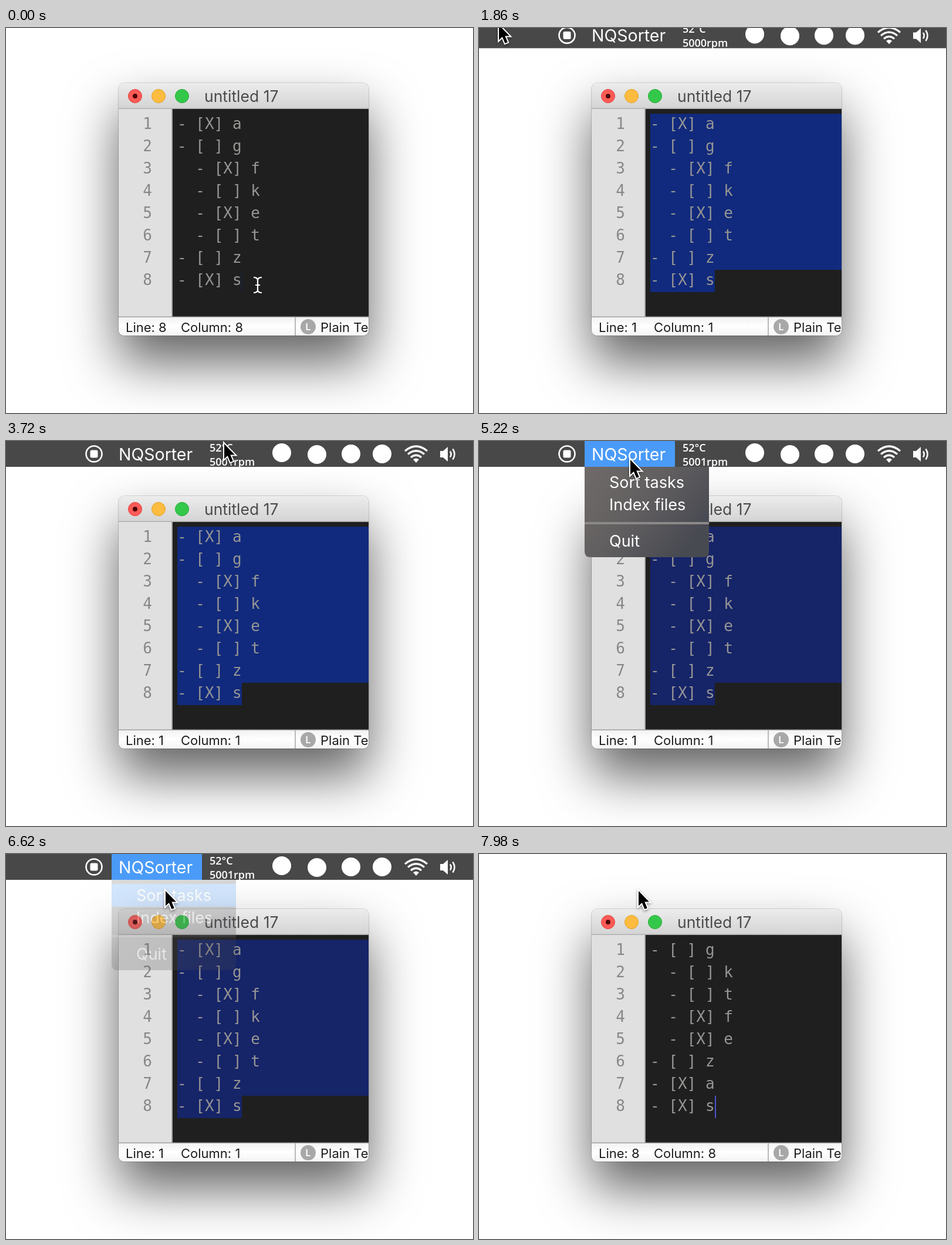
These frames come from a looping animation (796 by 656 pixels, 8 s). An HTML page:

```html
<!DOCTYPE html>
<html lang="en">
<head>
<meta charset="utf-8">
<title>Sorting a task list</title>
<style>
  html, body { margin: 0; width: 100%; height: 100%; overflow: hidden; background: #fff; }
  #shadow {
    position: absolute; left: 192px; top: 94px; width: 426px; height: 430px; border-radius: 10px;
    box-shadow: 0 0 0 1px rgba(0,0,0,.16), 0 46px 88px rgba(0,0,0,.62);
  }
  svg { position: absolute; left: 0; top: 0; width: 796px; height: 656px; overflow: hidden; }
  text { font-family: Inter, sans-serif; white-space: pre; }
  .code text { font: 26px "DejaVu Sans Mono", monospace; fill: #969694; }
  .code .num { fill: #878787; text-anchor: end; }
  .status { font-size: 22px; fill: #1c1c1c; }
  .bar text, .menu text { font-size: 27px; fill: #fff; }
  .bar .stat { font: 600 18px "Open Sans", sans-serif; }
  .line { fill: none; stroke: #fff; }
  #arrow { filter: drop-shadow(0 2px 2px rgba(0,0,0,.4)); }
</style>
</head>
<body>
<div id="shadow"></div>
<svg viewBox="0 0 796 656">
  <defs>
    <clipPath id="frame"><rect x="192" y="94" width="426" height="430" rx="9"/></clipPath>
    <linearGradient id="title" x2="0" y2="1"><stop stop-color="#ececec"/><stop offset="1" stop-color="#d3d3d3"/></linearGradient>
    <linearGradient id="foot" x2="0" y2="1"><stop stop-color="#f1f1f1"/><stop offset=".5" stop-color="#fff"/><stop offset="1" stop-color="#f4f4f4"/></linearGradient>
    <linearGradient id="glass" x2="1" y2=".6"><stop stop-color="#706b69"/><stop offset=".5" stop-color="#625f60"/><stop offset="1" stop-color="#484a52"/></linearGradient>
  </defs>

  <g clip-path="url(#frame)">
    <rect x="192" y="94" width="426" height="44" fill="url(#title)"/>
    <rect x="192" y="94" width="426" height="1" fill="#f6f6f6"/>
    <rect x="192" y="136.500" width="426" height="1.500" fill="#b0b0b0"/>
    <circle cx="220" cy="116" r="11.500" fill="#fc5b57" stroke="#e2443f"/>
    <circle cx="220" cy="116" r="4" fill="#4d0000"/>
    <circle cx="260" cy="116" r="11.500" fill="#fdbc40" stroke="#dfa023"/>
    <circle cx="300" cy="116" r="11.500" fill="#34c84a" stroke="#27aa35"/>
    <text x="338" y="126" font-size="26.500" fill="#4b4b4b">untitled 17</text>

    <rect x="192" y="138" width="92" height="354" fill="#e0e0e0"/>
    <rect x="282" y="138" width="2" height="354" fill="#a6a6a6"/>
    <rect x="284" y="138" width="334" height="354" fill="#1f1f1f"/>
    <path id="sel"/>
    <g class="code" id="code"></g>
    <rect id="caret" x="402" y="412" width="2" height="38" fill="#4b55cf"/>

    <rect x="192" y="492" width="426" height="32" fill="url(#foot)"/>
    <rect x="192" y="491.500" width="426" height="1.500" fill="#a2a2a2"/>
    <text class="status" id="row" x="204" y="518"></text>
    <text class="status" id="col" x="298" y="518"></text>
    <rect x="492" y="493" width="2" height="31" fill="#b9b9b9"/>
    <circle cx="515" cy="509" r="13" fill="#a8a8a8"/>
    <text x="515" y="515" font-size="16" font-weight="600" fill="#fff" text-anchor="middle">L</text>
    <text class="status" x="536" y="518">Plain Text</text>
  </g>

  <g class="menu" id="menu">
    <path d="M180 44H392V188Q392 198 382 198H190Q180 198 180 188Z" fill="url(#glass)"/>
    <rect id="pick" x="180" y="51" width="212" height="39" fill="#4a9bf8"/>
    <rect x="180" y="138" width="212" height="4" fill="#8b8888"/>
    <text x="222" y="80">Sort tasks</text>
    <text x="222" y="118">Index files</text>
    <text x="222" y="180">Quit</text>
  </g>

  <g class="bar" id="bar">
    <rect width="796" height="44" fill="#484848"/>
    <rect id="lit" x="180" width="154" height="44" fill="#4a9bf8"/>
    <circle class="line" cx="150" cy="22" r="13.500" stroke-width="2.600"/>
    <rect x="143.500" y="15.500" width="13" height="13" rx="2.500" fill="#fff"/>
    <text x="192" y="33" style="font-size:28.500px">NQSorter</text>
    <text class="stat" x="347" y="18">52°C</text>
    <text class="stat" id="rpm" x="347" y="42"></text>
    <g fill="#fff">
      <circle cx="470" cy="20" r="16"/><circle cx="530" cy="23" r="16"/>
      <circle cx="588" cy="22" r="16"/><circle cx="641" cy="22" r="16"/>
      <path d="M699 37l-5-5.500q5-4 10 0z"/>
      <path d="M740 17h5l8-7v25l-8-7h-5z"/>
    </g>
    <path class="line" stroke-width="3.200" d="M680 17Q699 1 718 17M685 22.500Q699 11 713 22.500M690 28Q699 20.500 708 28"/>
    <path class="line" stroke-width="2.600" d="M757 17.500q3.500 5 0 10M761.500 13.500q6 9 0 18"/>
  </g>

  <path id="beam" class="line" stroke-width="2.200" d="M-7-13Q0-13 0-8V8Q0 13-7 13M7-13Q0-13 0-8M0 8Q0 13 7 13M-4 0H4"/>
  <path id="arrow" d="M0 0V25.500L5.800 20L10.400 31L14.800 29.200L10.300 18.400H18Z" stroke="#fff" stroke-width="4" paint-order="stroke"/>
</svg>
<script>
const LOOP = 8000, ROW = 38, TOP = 146, LEFT = 292, CHAR = 15.65;
const before = ["- [X] a", "- [ ] g", "  - [X] f", "  - [ ] k", "  - [X] e", "  - [ ] t", "- [ ] z", "- [X] s"];
const after = ["- [ ] g", "  - [ ] k", "  - [ ] t", "  - [X] f", "  - [X] e", "- [ ] z", "- [X] a", "- [X] s"];

// time, x, y of the pointer
const path = [
  [20, 429, 438], [780, 177, 121], [840, 177, 121], [920, 174, 119], [1200, 174, 119],
  [1760, 34, -5], [2020, 34, -5], [2820, 152, 4], [2880, 152, 4], [3680, 370, 6],
  [3720, 372, 5], [4220, 372, 5], [4820, 258, 32], [5240, 258, 32], [5740, 272, 63]
];
const OPEN = 4900, CLOSED = 6670, SORTED = 7500;

const $ = id => document.getElementById(id);
const clamp = (v, lo = 0, hi = 1) => Math.min(hi, Math.max(lo, v));
const span = (t, a, b) => clamp((t - a) / (b - a));
const smooth = p => p * p * (3 - 2 * p);
const show = (id, on) => $(id).setAttribute("visibility", on ? "visible" : "hidden");
const move = (id, x, y) => $(id).setAttribute("transform", `translate(${x} ${y})`);

function addText(x, y, cls) {
  const el = document.createElementNS("http://www.w3.org/2000/svg", "text");
  el.setAttribute("x", x);
  el.setAttribute("y", y);
  el.setAttribute("class", cls);
  return $("code").appendChild(el);
}
const rows = before.map((_, i) => {
  const y = 172 + i * ROW;
  addText(249, y, "num").textContent = i + 1;
  return addText(LEFT, y, "");
});

function pointer(t) {
  const i = path.findIndex(k => k[0] > t);
  if (i < 0) return path[path.length - 1].slice(1);
  if (!i) return path[0].slice(1);
  const [a, x0, y0] = path[i - 1], [b, x1, y1] = path[i];
  const p = smooth(span(t, a, b));
  return [x0 + (x1 - x0) * p, y0 + (y1 - y0) * p];
}

function selection(row, col) {
  const x = LEFT + col * CHAR, y = TOP + row * ROW, last = TOP + 7 * ROW;
  if (row === 7) return `M${x} ${y}H402V${y + ROW}H${x}Z`;
  return `M${x} ${y}H618V${last}H402V${last + ROW}H${LEFT}V${y + ROW}H${x}Z`;
}

function draw(t) {
  const [x, y] = pointer(t);
  const sorted = t >= SORTED;
  const lines = sorted ? after : before;
  rows.forEach((el, i) => { if (el.textContent !== lines[i]) el.textContent = lines[i]; });

  let row = 7, col = 7;
  if (!sorted) {
    const [dx, dy] = pointer(Math.min(t, 920));
    row = clamp(Math.floor((dy - TOP) / ROW), 0, 7);
    col = clamp(Math.round((dx - LEFT) / CHAR), 0, lines[row].length);
  }
  $("sel").setAttribute("d", selection(row, col));
  $("sel").setAttribute("fill", t < OPEN ? "#112a7d" : "#162468");
  show("sel", !sorted);
  show("caret", sorted);
  $("row").textContent = "Line: " + (row + 1);
  $("col").textContent = "Column: " + (col + 1);

  const down = 1 - (1 - span(t, 1740, 1965)) ** 2;
  const up = smooth(span(t, 6760, 7020));
  move("bar", 0, -44 * (1 - down + up));
  $("rpm").textContent = t < 2880 ? "5000rpm" : "5001rpm";

  const open = t >= OPEN && t < CLOSED;
  show("lit", open);
  show("menu", open);
  show("pick", open && y > 50 && !(t >= 6340 && t < 6400));
  $("menu").setAttribute("opacity", 1 - span(t, 6460, CLOSED));

  const text = t < 920 && x > 284;
  show("beam", text);
  show("arrow", !text);
  move("beam", x, y);
  move("arrow", x, y);
}

let start;
function tick(now) {
  start ??= now;
  draw((now - start) % LOOP);
  requestAnimationFrame(tick);
}
draw(0);
requestAnimationFrame(tick);
</script>
</body>
</html>
```
